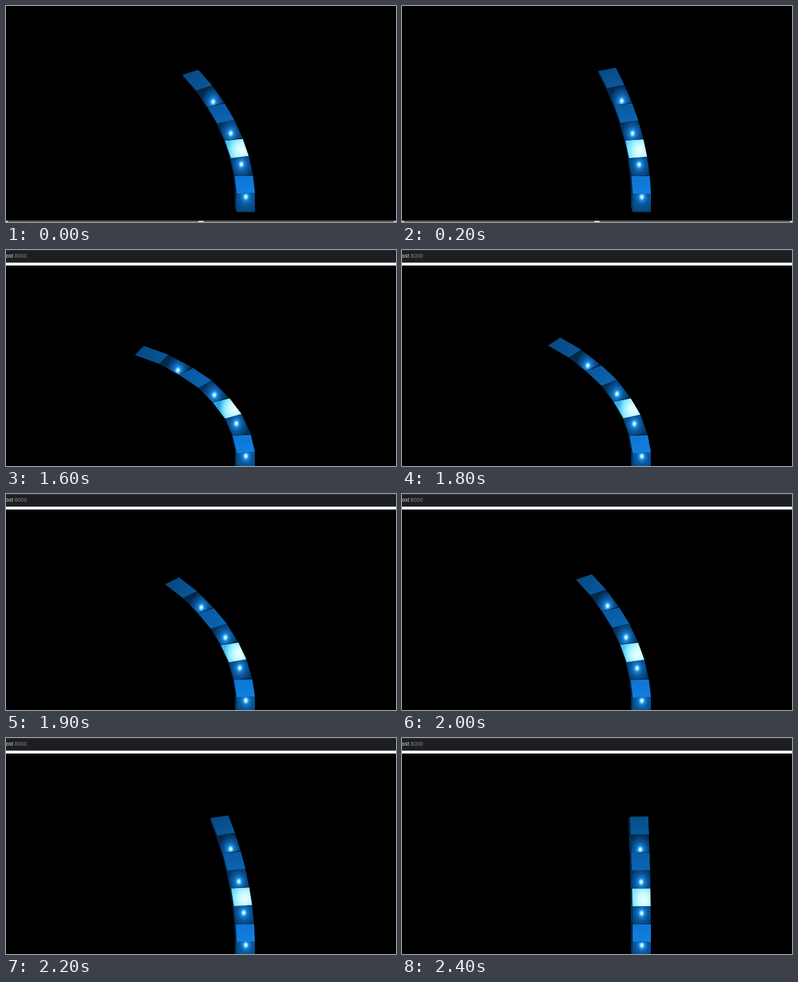
Animation, 600 px wide and 334 px high, one loop 2.5 s. Source, as an HTML page with a canvas:

```html
<!DOCTYPE html>
<html lang="en">
<head>
<meta charset="utf-8">
<title>Bending arm</title>
<style>
html, body { margin: 0; width: 100%; height: 100%; overflow: hidden; background: #000; }
canvas { display: block; width: 100%; height: 100%; }
</style>
</head>
<body>
<canvas id="c" width="600" height="334"></canvas>
<script>
const ctx = document.getElementById('c').getContext('2d');
const LOOP = 2500, STEP = 100, SCROLL_AT = 1400;
const RAD = Math.PI / 180;

// joint bend in degrees over time
const swing = [[0, 4.16], [200, 2.57]];
const sweep = [[1400, 8.87], [1600, 8.7], [1800, 6.87], [2000, 4.36], [2200, 1.94], [2400, 0.2]];

const lerp = (a, b, u) => a + (b - a) * u;
const mix = (a, b, u) => `rgb(${a.map((v, i) => Math.round(lerp(v, b[i], u))).join(',')})`;

// Catmull-Rom through evenly spaced keys
function sample(keys, t) {
  const last = keys.length - 1, span = keys[1][0] - keys[0][0];
  const x = Math.max(0, Math.min(last, (t - keys[0][0]) / span));
  const i = Math.min(last - 1, Math.floor(x)), u = x - i;
  const a = keys[i][1], b = keys[i + 1][1];
  const p = i > 0 ? keys[i - 1][1] : 2 * a - b;
  const n = i + 2 <= last ? keys[i + 2][1] : 2 * b - a;
  return a + u / 2 * (b - p + u * (2 * p - 5 * a + 4 * b - n + u * (3 * (a - b) + n - p)));
}

function poly(points, fill) {
  ctx.beginPath();
  points.forEach(([x, y]) => ctx.lineTo(x, y));
  ctx.closePath();
  ctx.fillStyle = fill;
  ctx.fill();
}

// left and right corners at each of the nine joints
function armEdges(bend, baseY) {
  const edges = [];
  let x = 369, y = baseY + 27.8;
  for (let j = 0; j <= 8; j++) {
    const turn = (j === 0 ? 0 : j % 2 ? j : j - 1) * bend * RAD;
    const w = 14 * Math.cos(turn), h = 8.2 * Math.sin(turn);
    edges.push([[x - w, y + h], [x + w, y - h]]);
    const a = j * bend * RAD;
    const stretch = j % 2 ? 1 : 1 + 0.01 * bend;
    x -= 43 * Math.sin(a);
    y -= 27.7 * Math.cos(a) * stretch;
  }
  return edges;
}

// point inside a segment: u from left to right, v from bottom to top
function inside(lo, hi, u, v) {
  return [0, 1].map(i => lerp(lerp(lo[0][i], lo[1][i], u), lerp(hi[0][i], hi[1][i], u), v));
}

function glow(quad, [x, y], angle, r, stops) {
  ctx.save();
  ctx.beginPath();
  quad.forEach(p => ctx.lineTo(p[0], p[1]));
  ctx.closePath();
  ctx.clip();
  ctx.translate(x, y);
  ctx.rotate(angle);
  ctx.scale(0.88, 1.1);
  const g = ctx.createRadialGradient(0, 0, 0, 0, 0, r);
  stops.forEach(([at, color]) => g.addColorStop(at, color));
  ctx.fillStyle = g;
  ctx.fillRect(-90, -90, 180, 180);
  ctx.restore();
}

function drawSegment(k, lo, hi, bend) {
  const quad = [lo[0], lo[1], hi[1], hi[0]];
  const reach = k * bend / 62;
  if (k === 3) {
    const edge = mix([104, 220, 255], [34, 160, 232], bend / 9);
    glow(quad, inside(lo, hi, 0.62 + bend * 0.025, 0.36), 0, 27,
      [[0, '#edffff'], [0.35, '#c8f9ff'], [0.65, '#8cebff'], [1, edge]]);
  } else if (k % 2) {
    const tone = (k - 1) / 6;
    const top = mix([13, 118, 212], [7, 77, 137], tone + reach * 0.1);
    const low = mix([17, 127, 225], [9, 88, 156], tone + reach * 0.1);
    const a = inside(lo, hi, 0.5, 0), b = inside(lo, hi, 0.5, 1);
    const g = ctx.createLinearGradient(a[0], a[1], b[0], b[1]);
    g.addColorStop(0, low);
    g.addColorStop(1, top);
    poly(quad, g);
  } else {
    const v = [0.82, 0.61, 0.35, 0.16][k / 2];
    const u = 0.5 - 0.25 * Math.pow(k * bend / 54, 3);
    const floor = k === 0 ? '#06447c' : mix([5, 58, 108], [3, 40, 74], k / 6);
    const spot = inside(lo, hi, u, v + (k === 6 ? bend * 0.008 : 0));
    glow(quad, spot, reach * 0.3, 22, [
      [0, '#e2ffff'], [0.09, '#b4f2ff'], [0.16, '#54bcf4'], [0.25, '#1a7fd0'],
      [0.5, '#0a579e'], [1, floor]]);
  }
}

function drawArm(bend, scrolled) {
  const edges = armEdges(bend, scrolled ? 315.5 : 290.8);
  const cy = scrolled ? 190 : 165;
  const back = ([x, y]) => [x + (300 - x) * 0.048, y + (cy - y) * 0.048];

  for (let k = 0; k < 8; k++) {
    const lo = edges[k], hi = edges[k + 1];
    const shade = k % 2 ? '#04294a' : '#053662';
    for (const s of [0, 1])
      poly([lo[s], hi[s], back(hi[s]), back(lo[s])], s ? '#03182c' : shade);
  }
  for (let k = 0; k < 8; k++) drawSegment(k, edges[k], edges[k + 1], bend);

  // narrow openings on the outer side of the joints
  const gap = 0.4 + 1.5 * Math.min(1, bend / 7);
  for (let j = 2; j < 8; j += 2) {
    const [l, r] = edges[j];
    poly([l, [r[0] + gap * 0.4, r[1] - gap / 2], [r[0] + gap * 0.4, r[1] + gap / 2]], 'rgba(0,12,26,.85)');
  }
}

function drawHeader() {
  ctx.fillStyle = '#1d1e21';
  ctx.fillRect(0, 0, 600, 19);
  ctx.fillStyle = '#303134';
  ctx.fillRect(0, 0, 600, 1);
  ctx.fillStyle = '#fff';
  ctx.fillRect(0, 19.5, 600, 4.5);
  ctx.font = '7.6px Inter, Roboto, sans-serif';
  ctx.fillStyle = '#e8eaed';
  ctx.fillText('ost', 0, 12);
  const w = ctx.measureText('ost').width;
  ctx.fillStyle = '#8f9296';
  ctx.fillText(':8000', w, 12);
}

function drawFooter() {
  ctx.fillStyle = '#8c8c8c';
  ctx.fillRect(0, 332, 600, 1);
  ctx.fillStyle = '#3a3a3a';
  ctx.fillRect(0, 333, 600, 1);
  ctx.fillStyle = '#d8d8d8';
  for (const [x, w] of [[0, 3], [296, 8], [597, 3]]) ctx.fillRect(x, 332, w, 2);
}

function draw(now) {
  const t = Math.floor((now % LOOP) / STEP) * STEP;
  const scrolled = t >= SCROLL_AT;
  ctx.fillStyle = '#000';
  ctx.fillRect(0, 0, 600, 334);
  drawArm(sample(scrolled ? sweep : swing, t), scrolled);
  if (scrolled) drawHeader();
  else drawFooter();
}

const start = performance.now();
function tick() {
  draw(performance.now() - start);
  requestAnimationFrame(tick);
}
tick();
</script>
</body>
</html>
```
